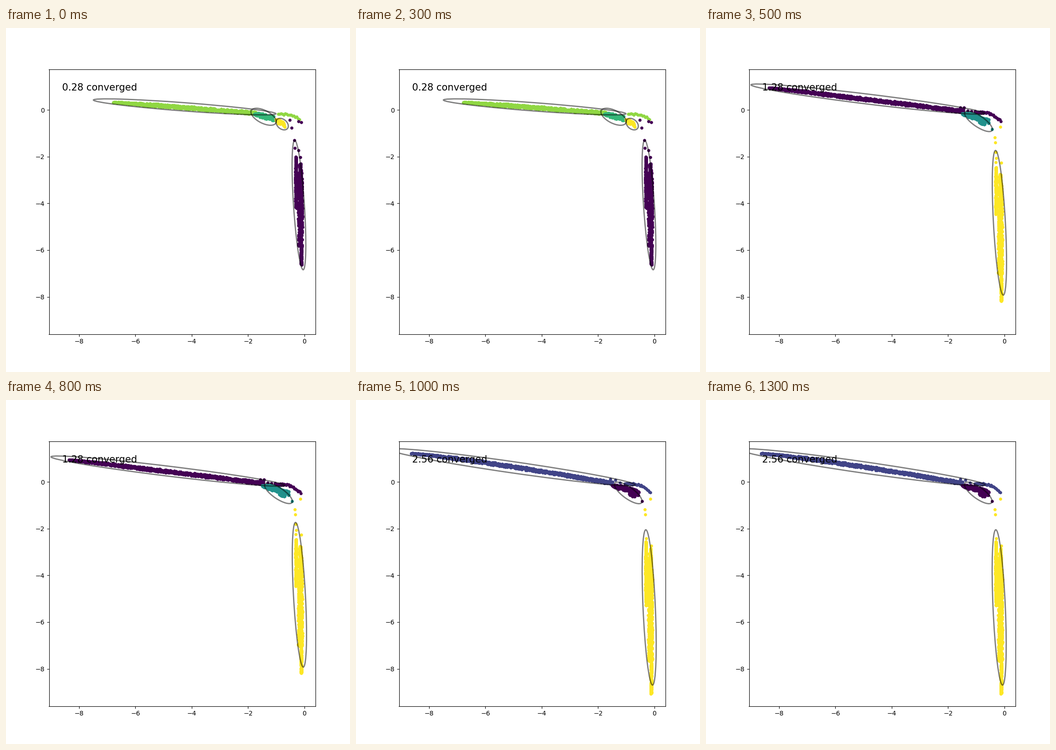
These frames come from a looping animation (748x748 px, 1500 ms). A matplotlib script:

```python
import numpy as np
import matplotlib.pyplot as plt
from matplotlib.animation import ArtistAnimation
from matplotlib.patches import Ellipse
from matplotlib.transforms import Affine2D

SIZE = 748
rng = np.random.default_rng(7)
viridis = plt.get_cmap("viridis")

fig, ax = plt.subplots(figsize=(SIZE / 100, SIZE / 100), dpi=100)
ax.set(xlim=(-9.069, 0.400), ylim=(-9.597, 1.741),
       xticks=range(-8, 1, 2), yticks=range(-8, 1, 2))

# Stage pixels, origin at the top left
stage = Affine2D().scale(1, -1).translate(0, SIZE)


def trail(start, end, spread, power=1, density=2.0, upright=False):
    """Jittered dots from start to end; y follows t ** power."""
    (x0, y0), (x1, y1) = start, end
    n = int(density * np.hypot(x1 - x0, y1 - y0))
    t = np.linspace(0, 1, n)
    x, y = x0 + (x1 - x0) * t, y0 + (y1 - y0) * t ** power
    jitter = rng.uniform(-1, 1, n) * spread * np.minimum(1, 0.25 + 3 * t)
    return np.c_[x + jitter, y] if upright else np.c_[x, y + jitter]


def arm(start, end, power, tail_start, tail_end, density):
    """Long left streak, loose dots after it and the hook at its end."""
    return [trail(start, end, 3.2, power),
            trail((553, 173), tail_start, 3, density=0.15),
            trail(tail_start, tail_end, 2, 3, density)]


def column(top, left_end, body_end, bottom):
    """Short left strand, wide body and thin tip."""
    strands = [((630.5, top), (631, left_end), 1.5),
               ((640, top + 15), (640, body_end), 4.6),
               ((642, body_end), (642, bottom), 1.2)]
    return [trail(*s, upright=True) for s in strands]


def bend(shade):
    """Blob where the two long streaks meet."""
    return cluster(shade,
                   trail((557, 187), (615, 203), 5.5, 1.3),
                   trail((594, 205), (607, 208), 3),
                   [(622, 220)])


def cluster(shade, *parts):
    pts = np.vstack(parts)
    return ax.scatter(pts[:, 0], pts[:, 1], s=15, color=viridis(shade),
                      transform=stage)


def ring(x, y, a, b, angle):
    return ax.add_patch(Ellipse((x, y), 2 * a, 2 * b, angle=angle, fill=False,
                                lw=2, ec="black", alpha=0.5, zorder=2,
                                transform=stage))


def label(value):
    return ax.text(0.05, 0.92, f"{value} converged", fontsize=15,
                   transform=ax.transAxes)


early = [
    cluster(5 / 6, *arm((233, 161.5), (543, 185), 1.05,
                        (592, 187), (638, 198), 0.35)[::2]),
    cluster(4 / 6, trail((540, 187), (582, 197), 5)),
    cluster(1.0, trail((587, 200), (606, 211), 5)),
    cluster(0.0, *column(280, 392, 475, 515),
            [(617, 200), (636, 203), (642, 205), (621, 217),
             (627, 244), (628, 261), (636, 266), (640, 281)]),
    ring(388.5, 171.5, 199, 9, 4.3),
    ring(560, 193, 30, 14, 27),
    ring(600.5, 209, 15, 10.5, 40),
    ring(637, 385, 141, 11.8, 86.25),
    label(0.28),
]

drops = [(639.5, 215), (627.5, 238), (628.5, 249)]

middle = [
    cluster(0.0, *arm((137, 130), (560, 181), 1.03,
                      (585, 183), (641, 203), 0.5)),
    bend(0.5),
    cluster(1.0, *column(303, 405, 537, 594), drops,
            [(630, 270), (631, 283), (630, 292), (642, 293)]),
    ring(352, 154.6, 256, 10.8, 6.96),
    ring(592.5, 203, 35.5, 12, 34),
    ring(638, 423.5, 157.5, 13, 86.9),
    label(1.28),
]

late = [
    cluster(0.2, *arm((120, 116), (558, 181), 1.18,
                      (585, 182), (640, 200), 0.5)),
    bend(0.0),
    cluster(1.0, *column(308, 447, 568, 639), drops,
            [(631, 301), (642, 317)]),
    ring(340, 146.2, 270, 12.3, 8.2),
    ring(592, 202, 36, 12.5, 36),
    ring(637.5, 451, 169, 13.4, 87.5),
    label(2.56),
]

anim = ArtistAnimation(fig, [early, middle, late], interval=500,
                       repeat=True, repeat_delay=0)
plt.show()
```
